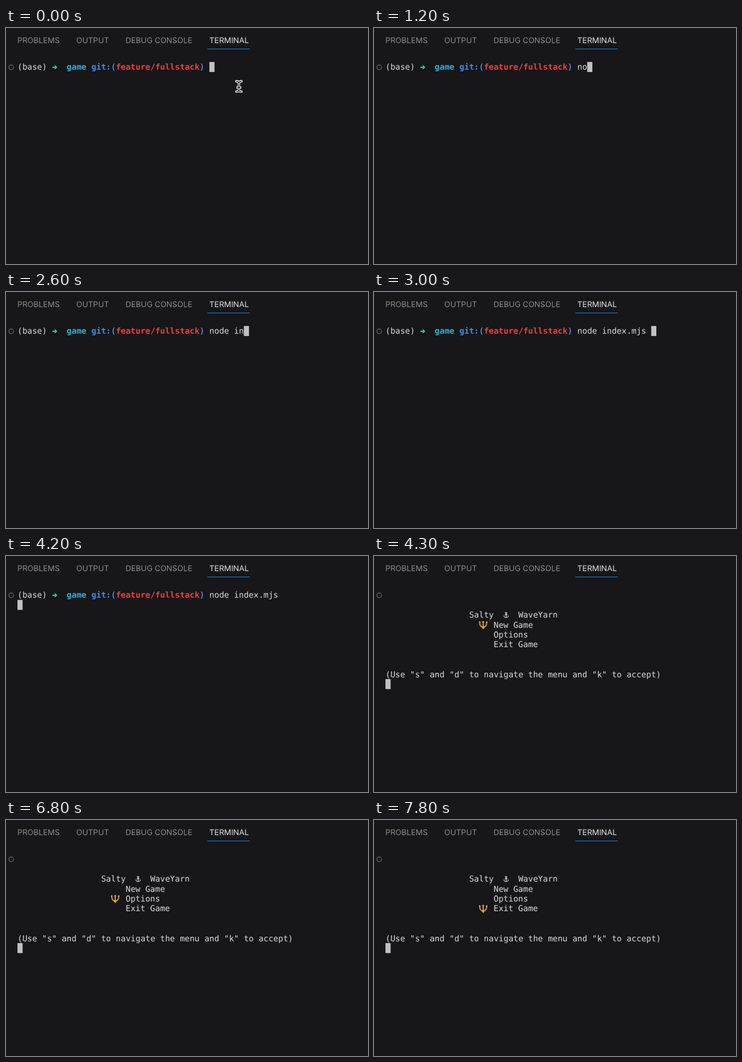
Recreate the animation shown at these times as an HTML page. Size 600x391 px, loop 8 s.

```html
<!DOCTYPE html>
<html lang="en">
<head>
<meta charset="utf-8">
<title>Terminal game menu</title>
<style>
  html, body { margin: 0; height: 100%; overflow: hidden; background: #171618; }
  svg { display: block; }
  text { white-space: pre; text-rendering: geometricPrecision; }
  .tabs { font: 12.95px Inter, sans-serif; fill: #8b8b8c; }
  .term { font: 13.55px "DejaVu Sans Mono", monospace; fill: #dcdcdc; }
  .bold { font-weight: bold; }
  .cyan { fill: #29b5d8; }
  .blue { fill: #3b8eea; }
  .red { fill: #f23f3c; }
</style>
</head>
<body>
<svg width="600" height="391" viewBox="0 0 600 391">
  <g class="tabs">
    <text x="19" y="24.6">PROBLEMS</text>
    <text x="116.5" y="24.6">OUTPUT</text>
    <text x="198" y="24.6">DEBUG CONSOLE</text>
    <text x="337" y="24.6" fill="#e4e4e4">TERMINAL</text>
  </g>
  <path d="M334 34.6H404" stroke="#1b70b5" stroke-width="1.4"/>
  <circle cx="8.5" cy="65" r="4" fill="none" stroke="#59595b" stroke-width="1.4"/>

  <g id="shell" class="term">
    <text x="19" y="69.3">(base)</text>
    <path d="M77 64h3.8v-3l4.4 4-4.4 4v-3H77z" fill="#23d18b"/>
    <text x="100.6" y="69.3" class="bold"><tspan class="cyan">game</tspan> <tspan class="blue">git:(</tspan><tspan class="red">feature/fullstack</tspan><tspan class="blue">)</tspan></text>
    <text id="command" x="337.1" y="69.3"></text>
  </g>

  <g id="menu" class="term">
    <text x="157.7" y="102.1">Salty</text>
    <g fill="none" stroke="#dcdcdc" stroke-width="1.1">
      <circle cx="219" cy="94.5" r="1.3"/>
      <path d="M219 96V102M216.5 97.5h5M215.2 98.8q.4 3.2 3.8 3.2t3.8-3.2"/>
    </g>
    <text x="239.2" y="102.1">WaveYarn</text>
    <text x="198.3" y="118.5">New Game</text>
    <text x="198.3" y="134.9">Options</text>
    <text x="198.3" y="151.3">Exit Game</text>
    <text x="19" y="200.5">(Use "s" and "d" to navigate the menu and "k" to accept)</text>
    <g id="trident" fill="none" stroke="#e9aa35" stroke-width="1.7">
      <path d="M0-5V7M-5.7-4.5C-6 4 -2 3.2 0 3.2S6 4 5.7-4.5M-2.4 4.6h4.8"/>
      <path d="M0-7l2 3h-4zM-6-6.4l2 2.8-3.4.2zM6-6.4l-2 2.8 3.4.2z" fill="#e9aa35" stroke="none"/>
    </g>
  </g>

  <rect id="cursor" width="8.5" height="16.6" fill="#c1c1c2"/>
  <g id="pointer" fill="none" stroke-linecap="square">
    <path id="beam" d="M382 88.3q4 0 4 3.2q0-3.2 4-3.2M386 91V103M382 105.4q4 0 4-3.2q0 3.2 4 3.2M384 98.5h4" stroke="#f0f0f0" stroke-width="3.4"/>
    <use href="#beam"/>
    <path d="M382 88.3q4 0 4 3.2q0-3.2 4-3.2M386 91V103M382 105.4q4 0 4-3.2q0 3.2 4 3.2M384 98.5h4" stroke="#171618" stroke-width="1.3"/>
  </g>
</svg>
<script>
const LOOP = 8000, CHAR = 8.157, LINE = 16.4;
const $ = id => document.getElementById(id);
const typing = [
  [0, ""], [800, "n"], [1200, "no"], [1300, "nod"], [1500, "node"], [1700, "node "],
  [2300, "node i"], [2600, "node in"], [2700, "node ind"], [2900, "node inde"],
  [3000, "node index.mjs "]
];
const ENTER = 4200, MENU = 4300, MOVES = [6500, 7500];

const show = (id, on) => $(id).setAttribute("display", on ? "inline" : "none");

function draw(t) {
  const command = typing.filter(([at]) => at <= t).pop()[1];
  const inMenu = t >= MENU;
  const row = inMenu ? 9 : t >= ENTER ? 1 : 0;
  const column = row ? 0 : 39 + command.length;
  const choice = MOVES.filter(at => at <= t).length;

  $("command").textContent = command;
  $("cursor").setAttribute("x", 19 + column * CHAR);
  $("cursor").setAttribute("y", 56.3 + row * LINE);
  $("trident").setAttribute("transform", `translate(181 ${114 + choice * LINE})`);
  show("shell", !inMenu);
  show("menu", inMenu);
  show("pointer", t < typing[1][0]);
}

const start = performance.now();
function tick() {
  draw((performance.now() - start) % LOOP);
  requestAnimationFrame(tick);
}
tick();
</script>
</body>
</html>
```
